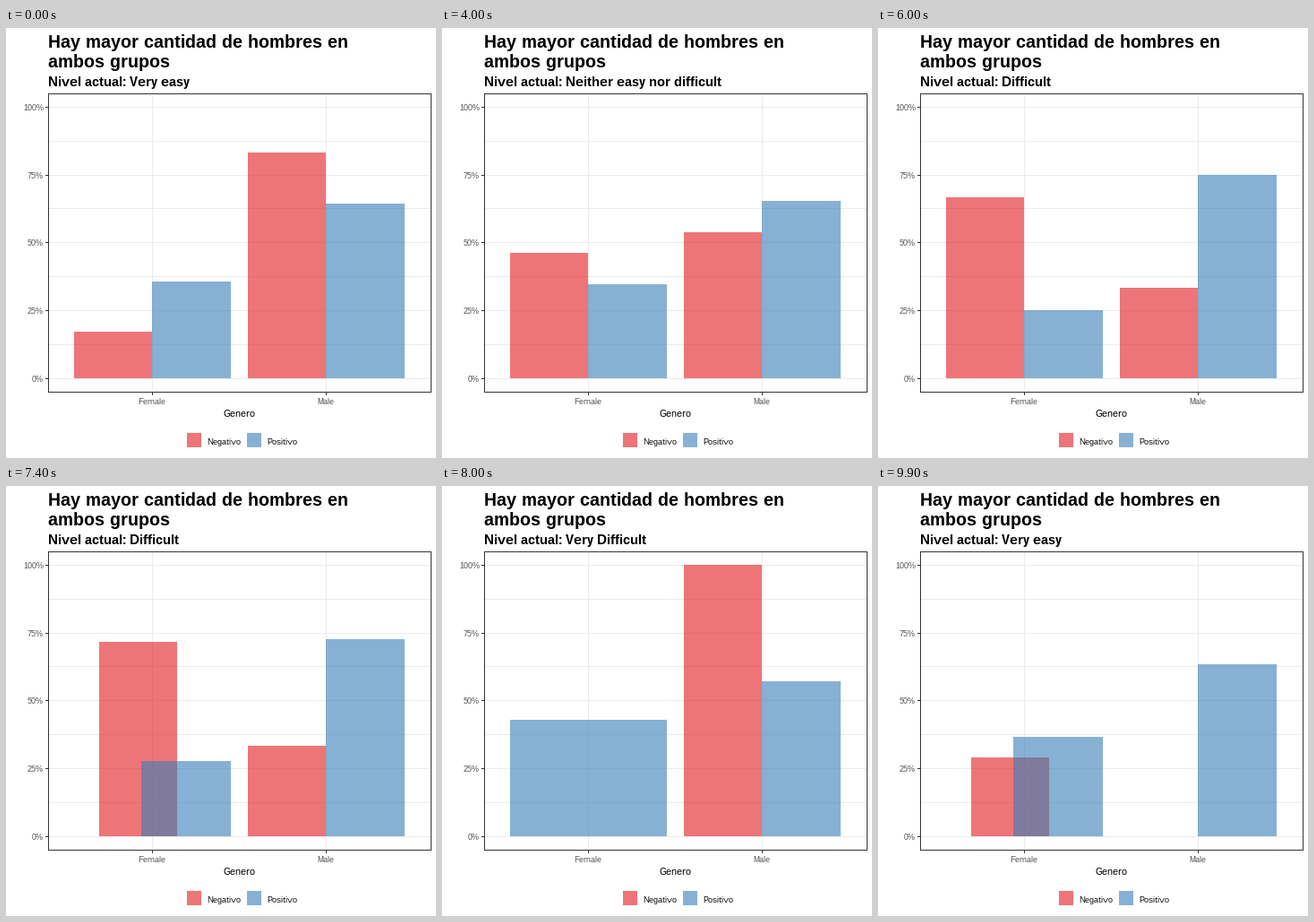
These frames come from a looping animation (480 px wide and 480 px high, 10000 ms). A matplotlib script:

```python
import math

import matplotlib.pyplot as plt
from matplotlib.animation import FuncAnimation
from matplotlib.patches import Rectangle

SIZE, DPI = 480, 96
FRAMES, INTERVAL = 100, 100
SPAN, HOLD, MOVE = 20, 13, 7      # frames per level, resting, moving

plt.rcParams["font.family"] = "Liberation Sans"
plt.rcParams["text.hinting"] = "native"
plt.rcParams["text.hinting_factor"] = 1

RED, BLUE = "#E41A1C", "#377EB8"
GRID, DARK, LABEL = "#EBEBEB", "#333333", "#4D4D4D"

ZERO, SCALE = 391.1, 302.75       # y of 0 % and height of 100 %
FEMALE, MALE, BAR = 163.75, 357.8, 87.35

LEVELS = ["Very easy", "Easy", "Neither easy nor difficult",
          "Difficult", "Very Difficult"]
NEG_F = [0.1698, 0.34, 6 / 13, 2 / 3, None]
POS_F = [0.356, 0.363, 0.346, 0.25, 3 / 7]


def level_pose(i):
    """Left edge and height of the lead red bar, left edge and height of the blue one."""
    if NEG_F[i] is None:
        return MALE - BAR, 1.0, FEMALE - BAR, POS_F[i]
    return FEMALE - BAR, NEG_F[i], FEMALE, POS_F[i]


def y_of(share):
    return math.floor(ZERO - share * SCALE)


fig = plt.figure(figsize=(SIZE / DPI, SIZE / DPI), dpi=DPI, facecolor="white")
ax = fig.add_axes([0, 0, 1, 1])
ax.set_xlim(0, SIZE)
ax.set_ylim(SIZE, 0)
ax.axis("off")


def box(x0, y0, x1, y1, color, alpha=1, z=1):
    patch = Rectangle((x0, y0), x1 - x0, y1 - y0, facecolor=color, alpha=alpha,
                      linewidth=0, antialiased=False, zorder=z)
    return ax.add_patch(patch)


def text(x, y, s, px, color="black", ha="left", weight="normal"):
    return ax.text(x, y, s, fontsize=px * 72 / DPI, color=color, ha=ha,
                   va="baseline", weight=weight, zorder=6)


def place(patch, left, right, share):
    x0, top = math.floor(left), y_of(share)
    patch.set_bounds(x0, top, math.floor(right) - x0, y_of(0) - top)


# Panel
for n in range(9):
    y = y_of(n / 8)
    box(47, y, 474, y + 1, GRID)
    if n % 2 == 0:
        box(44, y, 47, y + 1, DARK)
        text(42, y + 4, f"{n * 25 // 2}%", 9, LABEL, "right")
for center, name in ((FEMALE, "Female"), (MALE, "Male")):
    x = math.floor(center)
    box(x, 73, x + 1, 406, GRID)
    box(x, 407, x + 1, 410, DARK)
    text(x, 420, name, 9, LABEL, "center")
for edges in ((47, 73, 475, 74), (47, 406, 475, 407),
              (47, 73, 48, 407), (474, 73, 475, 407)):
    box(*edges, DARK, z=5)

# Titles and legend
text(47, 22, "Hay mayor cantidad de hombres en", 20, weight="bold")
text(47, 44, "ambos grupos", 20, weight="bold")
subtitle = text(47, 65, "", 15, weight="bold")
text(260.5, 434, "Genero", 11, ha="center")
for x, color, name in ((202, RED, "Negativo"), (269, BLUE, "Positivo")):
    box(x, 452, x + 16, 468, color, 0.6)
    text(x + 22, 465, name, 9)

# Bars
red_lead, red_male = (box(0, 0, 1, 1, RED, 0.6, 2) for _ in range(2))
blue_female, blue_male = (box(0, 0, 1, 1, BLUE, 0.6, 3) for _ in range(2))


def update(frame):
    i, step = divmod(frame, SPAN)
    nxt = (i + 1) % len(LEVELS)
    k = max(0, step - HOLD) / MOVE
    pose = [a + (b - a) * k for a, b in zip(level_pose(i), level_pose(nxt))]
    red_x, red_h, blue_x, blue_h = pose

    place(red_lead, red_x, red_x + BAR, red_h)
    place(blue_female, blue_x, FEMALE + BAR, blue_h)
    place(blue_male, MALE, MALE + BAR, 1 - blue_h)

    # The male red bar waits in place when the lead bar takes over its slot
    start, end = NEG_F[i], NEG_F[nxt]
    red_male.set_visible(start is not None)
    if start is not None:
        share = start if end is None else start + (end - start) * k
        place(red_male, MALE - BAR, MALE, 1 - share)

    subtitle.set_text("Nivel actual: " + LEVELS[nxt if k > 0.5 else i])
    return red_lead, red_male, blue_female, blue_male, subtitle


anim = FuncAnimation(fig, update, frames=FRAMES, interval=INTERVAL,
                     repeat=True, repeat_delay=0, blit=False)
plt.show()
```
